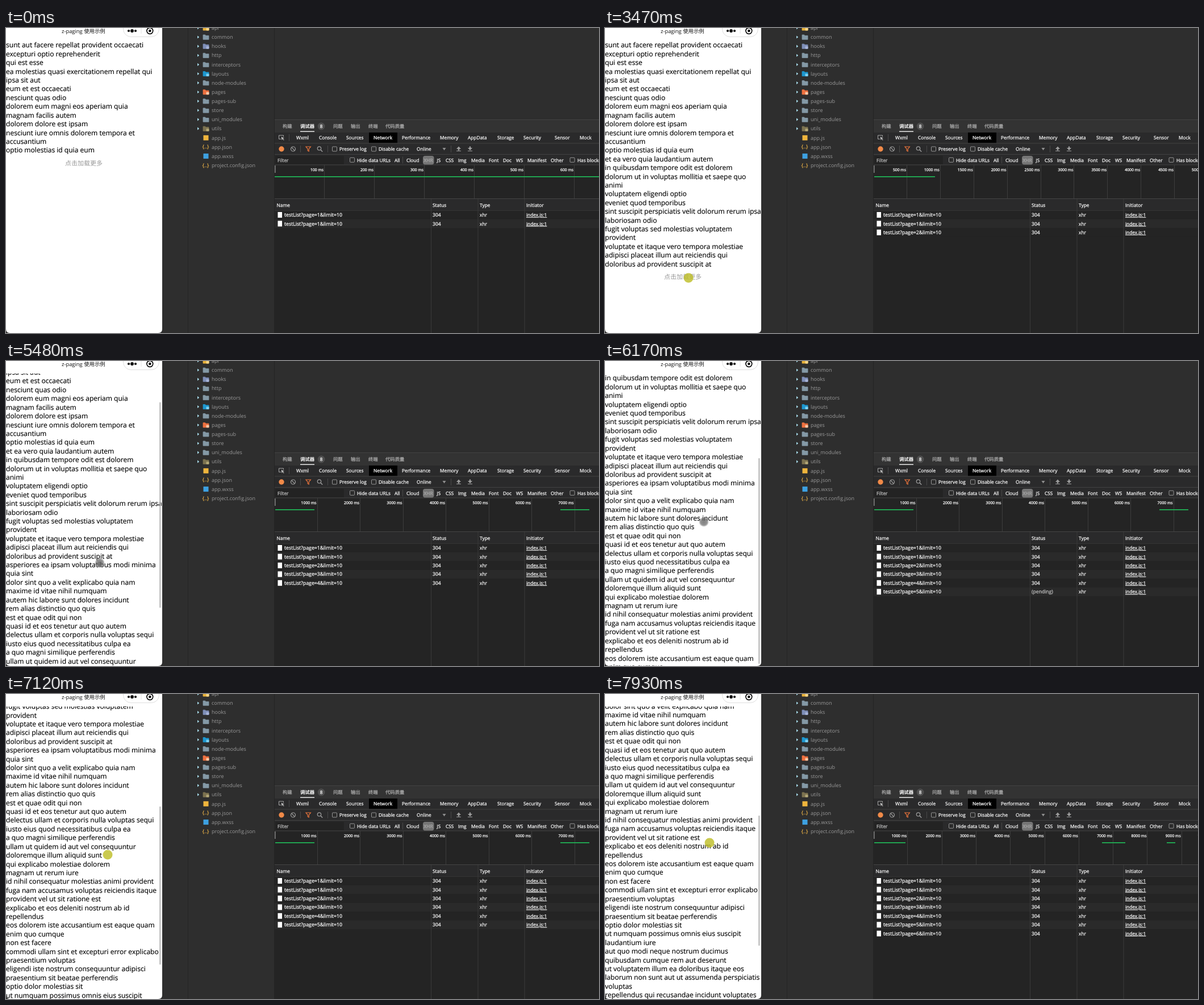
Animation of 1044x537 px, one loop 8 s. Source, as an HTML page:

```html
<!DOCTYPE html>
<html lang="zh">
<head>
<meta charset="utf-8">
<style>
html, body { margin: 0; width: 100%; height: 100%; overflow: hidden; background: #2e2e2e; }
svg { display: block; width: 1044px; height: 537px; }
text { font-family: "Open Sans", "Noto Sans CJK SC", "Noto Sans CJK", sans-serif; text-rendering: geometricPrecision; white-space: pre; }
.strong text { stroke: currentColor; stroke-width: .28px; }
#list text { stroke: #000; stroke-width: .15px; }
#list #more { stroke: none; }
</style>
</head>
<body>
<svg id="stage" viewBox="0 0 1044 537" xmlns="http://www.w3.org/2000/svg"></svg>
<script>
const LOOP = 8000, PITCH = 15.41, VIEW_H = 528;

// Helpers that return markup
const text = (x, y, s, size, fill = '#f4f4f4', extra = '') =>
  `<text x="${x}" y="${y}" font-size="${size}" fill="${fill}" color="${fill}" ${extra}>${s.replace(/&/g, '&amp;')}</text>`;
const rect = (x, y, w, h, fill, extra = '') =>
  `<rect x="${x}" y="${y}" width="${w}" height="${h}" fill="${fill}" ${extra}/>`;
const circle = (x, y, r, fill, extra = '') => `<circle cx="${x}" cy="${y}" r="${r}" fill="${fill}" ${extra}/>`;
const path = (d, stroke, extra = '') => `<path d="${d}" fill="none" stroke="${stroke}" ${extra}/>`;
const box = (x, y) => rect(x - 4, y - 4, 8, 8, '#2b2b2b', 'rx="1" stroke="#b0b0b0" stroke-width=".8"');
const id = name => document.getElementById(name);

const lines = `sunt aut facere repellat provident occaecati
excepturi optio reprehenderit
qui est esse
ea molestias quasi exercitationem repellat qui
ipsa sit aut
eum et est occaecati
nesciunt quas odio
dolorem eum magni eos aperiam quia
magnam facilis autem
dolorem dolore est ipsam
nesciunt iure omnis dolorem tempora et
accusantium
optio molestias id quia eum
et ea vero quia laudantium autem
in quibusdam tempore odit est dolorem
dolorum ut in voluptas mollitia et saepe quo
animi
voluptatem eligendi optio
eveniet quod temporibus
sint suscipit perspiciatis velit dolorum rerum ipsa
laboriosam odio
fugit voluptas sed molestias voluptatem
provident
voluptate et itaque vero tempora molestiae
adipisci placeat illum aut reiciendis qui
doloribus ad provident suscipit at
asperiores ea ipsam voluptatibus modi minima
quia sint
dolor sint quo a velit explicabo quia nam
maxime id vitae nihil numquam
autem hic labore sunt dolores incidunt
rem alias distinctio quo quis
est et quae odit qui non
quasi id et eos tenetur aut quo autem
delectus ullam et corporis nulla voluptas sequi
iusto eius quod necessitatibus culpa ea
a quo magni similique perferendis
ullam ut quidem id aut vel consequuntur
doloremque illum aliquid sunt
qui explicabo molestiae dolorem
magnam ut rerum iure
id nihil consequatur molestias animi provident
fuga nam accusamus voluptas reiciendis itaque
provident vel ut sit ratione est
explicabo et eos deleniti nostrum ab id
repellendus
eos dolorem iste accusantium est eaque quam
enim quo cumque
non est facere
commodi ullam sint et excepturi error explicabo
praesentium voluptas
eligendi iste nostrum consequuntur adipisci
praesentium sit beatae perferendis
optio dolor molestias sit
ut numquam possimus omnis eius suscipit
laudantium iure
aut quo modi neque nostrum ducimus
quibusdam cumque rem aut deserunt
ut voluptatem illum ea doloribus itaque eos
laborum non sunt aut ut assumenda perspiciatis
voluptas
repellendus qui recusandae incidunt voluptates
tenetur qui omnis exercitationem`.split('\n');

// Each page: number of lines once loaded, request time, load time
const pages = [
  { total: 13, sent: -1, done: -1 },
  { total: 26, sent: 1690, done: 2050 },
  { total: 37, sent: 3530, done: 3720 },
  { total: 48, sent: 4800, done: 5250 },
  { total: 63, sent: 6100, done: 6400 },
  { total: 77, sent: 7600, done: 7800 }
];
pages[3].sent = 4940;

// Timeline ruler: start time, ms per division, px per division, green bars
const rulers = [
  { at: 0, step: 100, px: 88, bars: [[473, 1044]] },
  { at: 1690, step: 500, px: 58.9, bars: [[474, 581]] },
  { at: 3530, step: 500, px: 47.1, bars: [[474, 560]] },
  { at: 4940, step: 1000, px: 75.5, bars: [[474, 543], [976, 1027]] },
  { at: 7600, step: 1000, px: 60.3, bars: [[474, 529], [875, 916], [989, 1004]] }
];

// [time, x, y]
const pointer = [
  [390, 782, 500], [1170, 170, 249], [1230, 163, 245], [1300, 157, 241], [1700, 157, 241],
  [2310, 160, 370], [2380, 160, 372], [2990, 147, 440], [3560, 147, 440], [3790, 160, 456],
  [4050, 164, 456], [4200, 262, 400], [4320, 205, 331], [4460, 160, 409], [4660, 160, 409],
  [4870, 158, 366], [5000, 164, 355], [5480, 165, 355], [5680, 172, 434], [5820, 172, 434],
  [6170, 174, 283], [6570, 176, 374], [6640, 176, 374], [7120, 179, 283], [7220, 179, 275],
  [7440, 182, 357], [7470, 182, 357], [7930, 184, 262]
];
const presses = [[1560, 1690], [3470, 3560], [4660, 5000], [5820, 6150], [6640, 7220], [7470, LOOP]];
const scroll = [
  [4660, 0], [4870, 43], [5000, 61], [5200, 72], [5820, 72], [6170, 215.6], [6400, 241],
  [6640, 241], [7120, 331.8], [7400, 345], [7470, 345], [7930, 440.2]
];

function along(keys, t) {
  if (t <= keys[0][0]) return keys[0].slice(1);
  for (let i = 1; i < keys.length; i++) {
    const [a, b] = [keys[i - 1], keys[i]];
    if (t <= b[0]) {
      const k = (t - a[0]) / (b[0] - a[0]);
      return a.slice(1).map((v, j) => v + (b[j + 1] - v) * k);
    }
  }
  return keys[keys.length - 1].slice(1);
}

function folder(y, color, mark) {
  return `<path d="M347 ${y - 4}h3.6l1.3 1.4h5.1v6.8h-10z" fill="${color}" stroke="${color}" stroke-width=".8" stroke-linejoin="round"/>` +
    (mark ? rect(352.5, y, 5, 4.5, mark, 'rx=".8"') : '');
}

function tree() {
  const rows = [
    ['api', '#e8b13a', '#f4d58a'], ['common', '#8499a6'], ['hooks', '#7f8fb8', '#a8b4d8'], ['http', '#8499a6'],
    ['interceptors', '#8499a6'], ['layouts', '#1d97cf', '#7fd0f0'], ['node-modules', '#8499a6'],
    ['pages', '#ee7140', '#f6c9a8'], ['pages-sub', '#8499a6'], ['store', '#8499a6'],
    ['uni_modules', '#8499a6'], ['utils', '#7c7250', '#b3a878'],
    ['app.js'], ['app.json'], ['app.wxss'], ['project.config.json']
  ];
  return rows.map(([name, color, mark], i) => {
    const y = i * 16.12 - .1;
    let icon;
    if (color) icon = `<path d="M337 ${y - 2.6}l3.2 2.6-3.2 2.6z" fill="#a5d8e6"/>` + folder(y, color, mark);
    else if (i === 12) icon = rect(347.5, y - 4.5, 9, 9, '#eeb43c');
    else if (i === 14) icon = rect(347.5, y - 4.5, 9, 9, '#3da0e0');
    else icon = text(345.5, y + 3, '{..}', 9.2, '#e5ae45', 'font-weight="600"');
    return icon + text(362, y + 3.2, name, 9, '#999');
  }).join('');
}

function labels(list, y, size, fill) {
  return list.map(([s, x, c]) => text(x, y, s, size, c || fill)).join('');
}

function devtools() {
  const sep = (x, y) => rect(x, y - 6, 1, 12, '#494949');
  let s = rect(473, 162, 571, 375, '#242424') + rect(473, 162, 571, 22, '#333') + rect(473, 161, 571, 1, '#424242');
  s += labels([['构建', 487], ['调试器', 518, '#fff'], ['问题', 576], ['输出', 607], ['终端', 638], ['代码质量', 668]], 176.3, 8.35, '#a6a6a6');
  s += rect(518, 181.5, 25, 1.5, '#e6e6e6') + circle(555, 173, 6.4, '#4f4f4f') + text(555, 176, '8', 8, '#fff', 'text-anchor="middle"');

  s += rect(473, 184, 571, 57, '#2a2a2b') + rect(639, 184, 50, 18.5, '#000');
  s += path('M484 195.5h-3.5v-6.5h8v2.5', '#a8a8a8') + `<path d="M484.5 191.5l5.5 2.3-2.3.9 2 2.3-1 .8-2-2.3-1.2 2z" fill="#b5b5b5"/>` + sep(498, 193);
  s += labels([['Wxml', 511], ['Console', 551], ['Sources', 599], ['Network', 647, '#fff'], ['Performance', 697], ['Memory', 764],
    ['AppData', 813], ['Storage', 865], ['Security', 911], ['Sensor', 966], ['Mock', 1010]], 196.4, 8.3);
  s += rect(473, 202.5, 571, 1, '#424242') + rect(473, 222, 571, 1, '#424242') + rect(473, 240.5, 571, 1, '#424242');

  s += circle(485, 213, 4.7, '#f28a48');
  s += circle(505.5, 213, 4, 'none', 'stroke="#a0a0a0" stroke-width="1.2"') + path('M502.7 210.2l5.6 5.6', '#a0a0a0', 'stroke-width="1.2"');
  s += sep(518, 213) + path('M528 209h8.4l-3.2 4v4l-2-1v-3z', '#f0763c', 'stroke-width="1.2"');
  s += circle(551.5, 212, 3.2, 'none', 'stroke="#a0a0a0" stroke-width="1.2"') + path('M554 214.5l3.2 3.2', '#a0a0a0', 'stroke-width="1.4"');
  s += sep(566, 213) + box(578.5, 213) + box(647.5, 213);
  s += labels([['Preserve log', 587], ['Disable cache', 656], ['Online', 723]], 216, 8.35);
  s += `<path d="M768.5 211h6l-3 4.5z" fill="#8f8f8f"/>` + sep(783, 213);
  s += '<g fill="#9c9c9c"><path d="M797 208.5l4 4.5h-2.8v2.5h-2.4v-2.5h-2.8z"/><path d="M817 215.5l4-4.5h-2.8v-2.5h-2.4v2.5h-2.8z"/></g>';
  s += rect(793, 216, 8, 1, '#9c9c9c') + rect(813, 216, 8, 1, '#9c9c9c');

  s += rect(474, 225, 121, 15, '#232323') + box(609.5, 232.3) + sep(698, 232.5) + rect(734, 225, 19.5, 15.5, '#757575', 'rx="4"');
  s += labels([['Filter', 478, '#c0c0c0'], ['Hide data URLs', 618], ['All', 684], ['Cloud', 705], ['XHR', 735.5, '#aaa'], ['JS', 758.5],
    ['CSS', 774], ['Img', 796], ['Media', 819], ['Font', 850], ['Doc', 875], ['WS', 898], ['Manifest', 918], ['Other', 959],
    ['Has blocked cookies', 1006]], 235.6, 8.3) + box(997, 232.3);

  s += '<g id="ruler"></g>' + rect(473, 242, 1.5, 13, '#858585');
  s += rect(473, 300, 571, 1, '#454545') + rect(473, 301, 571, 20, '#2a2a2b') + rect(473, 321, 571, 1, '#454545');
  s += labels([['Name', 476.5], ['Status', 751], ['Type', 834], ['Initiator', 916]], 314.6, 8.4);
  s += '<g id="rows"></g>';
  for (const x of [748, 830.5, 912.5]) s += rect(x, 301, 1, 236, '#3a3a3a');
  return `<g class="strong">${s}</g>`;
}

function phone() {
  let s = '<path d="M0 0H275V530Q275 537 268 537H7Q0 537 0 530Z" fill="#fff"/>';
  s += text(98, 9.3, 'z-paging 使用示例', 9.4, '#111');
  s += rect(206.5, -12, 63, 27.5, '#fff', 'rx="13.7" stroke="#dedede"') + rect(237.5, -2, 1, 12, '#e4e4e4');
  s += circle(216, 5, 2.1, '#000') + circle(222, 5, 2.9, '#000') + circle(228, 5, 2.1, '#000');
  s += circle(253.3, 5, 5.4, 'none', 'stroke="#000" stroke-width="1.6"') + circle(253.3, 5, 2.3, '#000');
  s += '<g clip-path="url(#view)"><g id="list">';
  s += lines.map((line, i) => text(0, 34.4 + i * PITCH, line, 12.06, '#000')).join('');
  s += text(104, 0, '点击加载更多', 11, '#999', 'id="more"') + '</g>';
  s += rect(270, 22, 2.6, 0, '#c2c2c2', 'id="thumb" rx="1.3"') + '</g>';
  return s;
}

id('stage').innerHTML = `<defs>
  <clipPath id="view"><path d="M0 22H275V530Q275 537 268 537H7Q0 537 0 530Z"/></clipPath>
  <radialGradient id="idle"><stop offset="0" stop-color="#555" stop-opacity=".75"/><stop offset=".7" stop-color="#666" stop-opacity=".7"/><stop offset="1" stop-color="#888" stop-opacity=".25"/></radialGradient>
</defs>` + rect(0, 0, 1044, 537, '#2e2e2e') + rect(320, 0, 1, 537, '#252525') + tree() + rect(472, 0, 1, 537, '#242424') +
  devtools() + phone() +
  circle(0, 0, 8.5, 'url(#idle)', 'id="dot"') +
  '<path id="arrow" d="M0 0v13l3-2.8 2 4.6 2-.9-2-4.5h4.2z" fill="#fff" stroke="#000" stroke-width=".8"/>';

const listLines = [...id('list').children].slice(0, lines.length);
const cache = {};
function fill(name, key, make) {
  if (cache[name] === key) return;
  cache[name] = key;
  id(name).innerHTML = make();
}

function drawRuler(r) {
  let s = '';
  for (let i = 1; 473 + i * r.px < 1110; i++) {
    const x = 473 + i * r.px;
    s += rect(Math.floor(x - .5), 241, 1, 59, '#3d3d3d') + text(x - 2, 251.6, i * r.step + ' ms', 6.8, '#fff', 'text-anchor="end"');
  }
  return s + r.bars.map(([a, b]) => rect(a, 261, b - a, 1.6, '#20c05a')).join('');
}

function drawRows(t) {
  const sent = [pages[0], ...pages].map((p, i) => ({ page: Math.max(1, i), ...p })).filter(p => t >= p.sent);
  return sent.map((p, i) => {
    const y = 329 + i * 15.45, base = y + 3.1;
    return rect(473, y - 7.5, 571, 15.4, i % 2 ? '#2a2a2a' : '#242424') +
      rect(478.5, y - 5, 7.5, 10, '#fff') +
      text(490, base, `testList?page=${p.page}&limit=10`, 8.72) +
      (t >= p.done ? text(751, base, '304', 8.6) : text(751, base, '(pending)', 8.6, '#bdbdbd')) +
      text(834, base, 'xhr', 8.4) +
      text(916, base, 'index.js:1', 8.25, '#f4f4f4', 'text-decoration="underline"');
  }).join('');
}

function render(t) {
  const loaded = pages.filter(p => t >= p.done).length;
  const asked = pages.filter(p => t >= p.sent).length;
  const total = pages[loaded - 1].total;
  const [s] = along(scroll, t);

  listLines.forEach((el, i) => el.setAttribute('display', i < total ? 'inline' : 'none'));
  id('list').setAttribute('transform', `translate(0 ${-s})`);
  id('more').setAttribute('y', 57.2 + (total - 1) * PITCH);
  id('more').setAttribute('display', t > 2050 && t < 2380 ? 'none' : 'inline');

  const content = total * PITCH + 30, ratio = VIEW_H / content;
  id('thumb').setAttribute('y', 23 + s * ratio);
  id('thumb').setAttribute('height', ratio < 1 ? VIEW_H * ratio : 0);

  const ruler = rulers.filter(r => t >= r.at).pop();
  fill('ruler', ruler.at, () => drawRuler(ruler));
  fill('rows', asked + '/' + loaded, () => drawRows(t));

  const [x, y] = along(pointer, t);
  const down = presses.some(([a, b]) => t >= a && t < b);
  const shown = t >= 390, inside = x < 275;
  const place = (name, on) => {
    id(name).setAttribute('transform', `translate(${x} ${y})`);
    id(name).setAttribute('display', on ? 'inline' : 'none');
  };
  place('dot', shown && inside);
  place('arrow', shown && !inside);
  id('dot').setAttribute('fill', down ? 'rgba(190,190,40,.82)' : 'url(#idle)');
}

const start = performance.now();
function tick(now) {
  render(Math.max(0, now - start) % LOOP);
  requestAnimationFrame(tick);
}
render(0);
requestAnimationFrame(tick);
</script>
</body>
</html>
```
